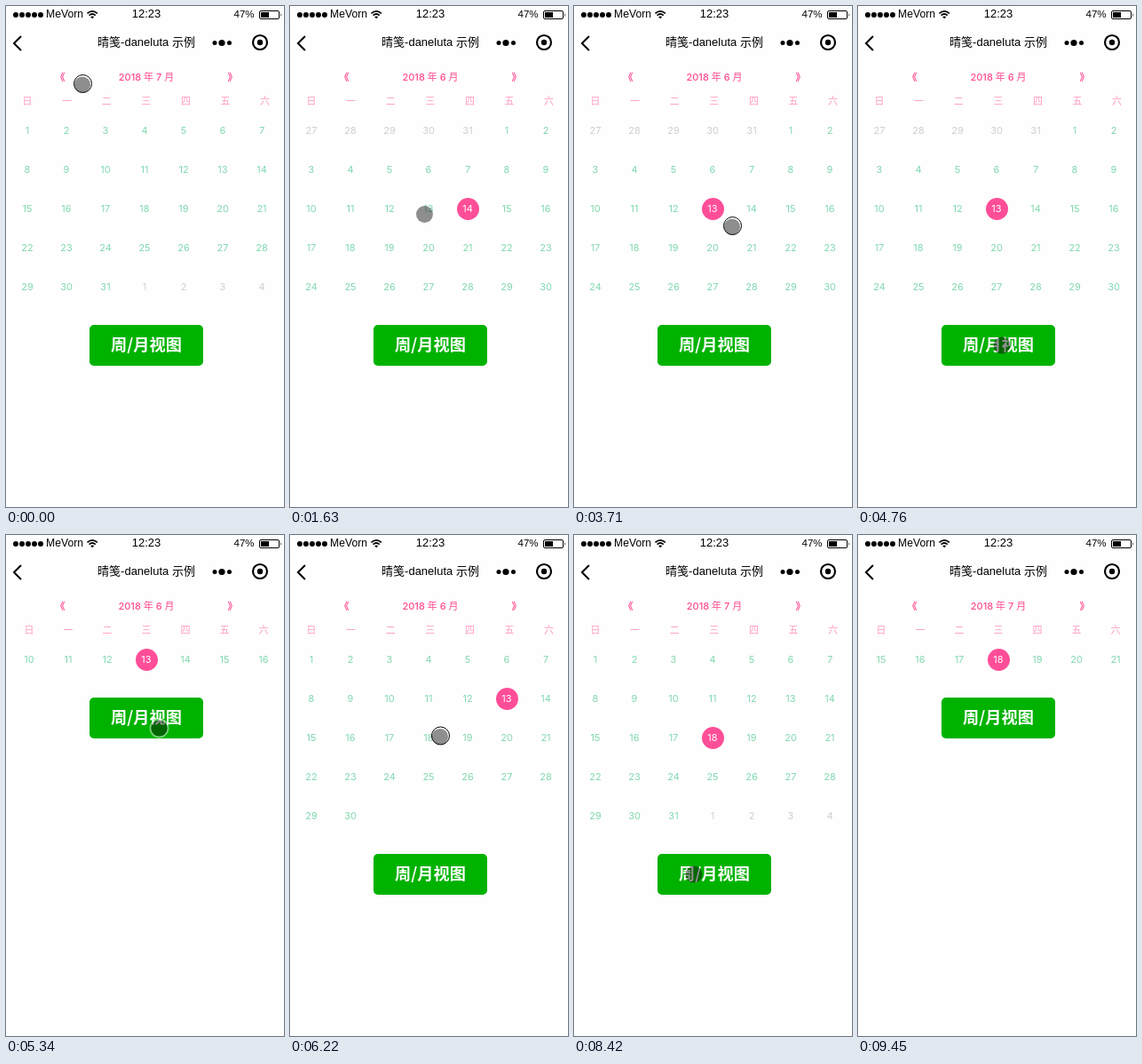
Write an HTML page that moves like this. It is 313 px wide and 564 px high and loops after 9.74 s.

```html
<!DOCTYPE html>
<html lang="zh-CN">
<head>
<meta charset="utf-8">
<title>日历</title>
<style>
  html, body { margin: 0; width: 100%; height: 100%; overflow: hidden; background: #fefefe; }
  svg { display: block; width: 100vw; height: 100vh; }
  text { font-family: Inter, "Noto Sans CJK SC", sans-serif; font-size: 11px; text-anchor: middle; }
  .bar { font-family: "Liberation Sans", "Noto Sans CJK SC", sans-serif; }
  .start { text-anchor: start; }
  .head { fill: #ff4a90; font-weight: 500; }
  .arrow { font-family: "Noto Sans CJK SC", sans-serif; font-weight: 700; }
  .week { fill: #ff9cc3; }
  .day { fill: #82d8b0; }
  .out { fill: #cfcfcf; }
  .on { fill: #fff; }
  .label { fill: #fff; font: 700 18.2px "Noto Sans CJK SC", sans-serif; }
</style>
</head>
<body>
<svg viewBox="0 0 313 564">
  <g id="status">
    <path d="M11 10H40" stroke="#000" stroke-width="6" stroke-linecap="round" stroke-dasharray="0 7"/>
    <text class="bar start" x="45" y="13" style="font-size:12.2px">MeVorn</text>
    <text class="bar" x="158" y="13" style="font-size:13px">12:23</text>
    <text class="bar start" x="256.5" y="13" style="font-size:11.5px">47%</text>
    <path d="M91.5 8.4Q97.2 3.4 102.9 8.4M93.6 10.6Q97.2 7.4 100.8 10.6"
          fill="none" stroke="#000" stroke-width="1.7"/>
    <path d="M95.2 12.2Q97.2 10.6 99.2 12.2L97.2 14.3Z"/>
    <rect x="285.5" y="5.5" width="22" height="9" rx="1.5" fill="none" stroke="#000"/>
    <rect x="287" y="7" width="9" height="6"/>
    <path d="M309 8.2Q310.8 10 309 11.8Z"/>
  </g>
  <g id="nav">
    <path d="M17 34L9 42L17 50" fill="none" stroke="#000" stroke-width="2"/>
    <text class="bar" x="158" y="45" style="font-size:13px">晴笺-daneluta 示例</text>
    <circle cx="235" cy="41.5" r="2.5"/>
    <circle cx="243" cy="41.5" r="3.6"/>
    <circle cx="251.5" cy="41.5" r="2.5"/>
    <circle cx="286" cy="41" r="8" fill="none" stroke="#000" stroke-width="2.2"/>
    <circle cx="286" cy="41" r="3.2"/>
  </g>
  <text class="head arrow start" x="55.5" y="84">《</text>
  <text class="head arrow start" x="249.5" y="84">》</text>
  <text class="head" id="title" x="158" y="84"></text>
  <g id="grid"></g>
  <g id="button">
    <rect x="94" y="359" width="128" height="46" rx="5" fill="#00b200"/>
    <text class="label" x="158" y="388">周/月视图</text>
  </g>
  <g id="cursor">
    <circle id="disc" r="9.5" fill="#000" fill-opacity=".44"/>
    <circle id="ring" r="10"/>
  </g>
</svg>
<script>
const LOOP = 9740, TICK = 148, CELL = 44, YEAR = 2018;
const $ = id => document.getElementById(id);

const moves = [], scenes = [];
const move = (at, steps, x, y, pressed) => moves.push({ at, steps, x, y, pressed });
const show = (at, month, options) => scenes.push({ at, month, ...options });

// The story: the pointer travels in even steps, the view switches at once.
show(0, 7);
move(0, 1, 86.5, 87.5, true);
move(150, 2, 63, 82);                       // previous month
show(440, 6, { picked: 10 });
move(880, 2, 183, 206.5);
move(1330, 1, 204, 229, true);              // pick two days
show(1475, 6, { picked: 14 });
move(1625, 1, 151.5, 234.5);
show(1920, 6, { picked: 13 });
move(2070, 3, 214.5, 274.5);
move(2810, 1, 130, 258);                    // swipe there and back
show(2810, 7);
move(3405, 3, 178.5, 247.5, true);
show(3700, 6, { picked: 13 });
move(4310, 4, 162, 382);                    // fold to a week, unfold
show(5050, 6, { picked: 13, folded: true });
move(5190, 2, 172.5, 217.5, true);
show(5780, 6, { picked: 13, unaligned: true });
move(6215, 1, 169.5, 226, true);            // swipe to the next month
move(6365, 1, 111, 228);
show(6365, 7);
move(6660, 3, 135.5, 385.5);
move(7245, 2, 151.5, 249.5);
move(7690, 1, 155, 232, true);              // pick a day, fold again
show(7980, 7, { picked: 18 });
move(8120, 2, 135, 382);
show(8560, 7, { picked: 18, folded: true });
move(8700, 1, 131.5, 200.5);
move(8860, 2, 215, 149.5);                  // leave
move(9150, 2, 300.5, 200.5);
const GONE = 9445;

function add(tag, attrs, text = '') {
  const el = document.createElementNS('http://www.w3.org/2000/svg', tag);
  for (const key in attrs) el.setAttribute(key, attrs[key]);
  el.textContent = text;
  $('grid').append(el);
}

function drawScene({ month, picked, folded, unaligned }) {
  const dateOf = n => new Date(YEAR, month - 1, n);
  const lead = unaligned ? 0 : dateOf(1).getDay();
  const days = new Date(YEAR, month, 0).getDate();
  const cells = unaligned ? days : Math.ceil((lead + days) / 7) * 7;
  const first = folded ? picked - dateOf(picked).getDay() : 1 - lead;
  const left = folded ? 26 : 24;

  $('title').textContent = `${YEAR} 年 ${month} 月`;
  $('grid').replaceChildren();
  [...'日一二三四五六'].forEach((name, i) =>
    add('text', { x: left + i * (folded ? CELL : 44.6), y: 111, class: 'week' }, name));

  for (let i = 0; i < (folded ? 7 : cells); i++) {
    const n = first + i;
    const x = left + CELL * (i % 7), y = 140 + CELL * Math.floor(i / 7);
    const outside = n < 1 || n > days;
    if (n === picked) add('circle', { cx: x + 0.5, cy: y + 0.5, r: 12.5, fill: '#ff4e98' });
    const kind = n === picked ? 'on' : outside ? 'out' : '';
    add('text', { x, y: y + 4, class: 'day ' + kind }, dateOf(n).getDate());
  }
  $('button').setAttribute('transform', `translate(0 ${folded ? -4 * CELL : 0})`);
}

function drawCursor(t, folded) {
  const i = moves.findLastIndex(m => m.at <= t);
  const to = moves[i], from = moves[i - 1] || to;
  const p = Math.min(1, (Math.floor((t - to.at) / TICK) + 1) / to.steps);
  const x = from.x + (to.x - from.x) * p, y = from.y + (to.y - from.y) * p;
  const overButton = Math.abs(x - 158) < 64 && Math.abs(y - (folded ? 206 : 382)) < 23;
  const dark = to.pressed && !overButton;

  $('cursor').style.display = t < GONE ? '' : 'none';
  $('cursor').setAttribute('transform', `translate(${x} ${y})`);
  $('disc').setAttribute('transform', dark ? 'translate(-.5 1) scale(.95)' : '');
  $('ring').setAttribute('fill', 'none');
  $('ring').setAttribute('stroke', dark ? '#000' : to.pressed ? 'rgba(255,255,255,.45)' : 'none');
  $('ring').setAttribute('stroke-width', dark ? 1 : 1.8);
}

let lastScene;

function tick() {
  const t = performance.now() % LOOP;
  const scene = scenes.findLast(s => s.at <= t);
  if (scene !== lastScene) drawScene(lastScene = scene);
  drawCursor(t, scene.folded);
  requestAnimationFrame(tick);
}
tick();
</script>
</body>
</html>
```
